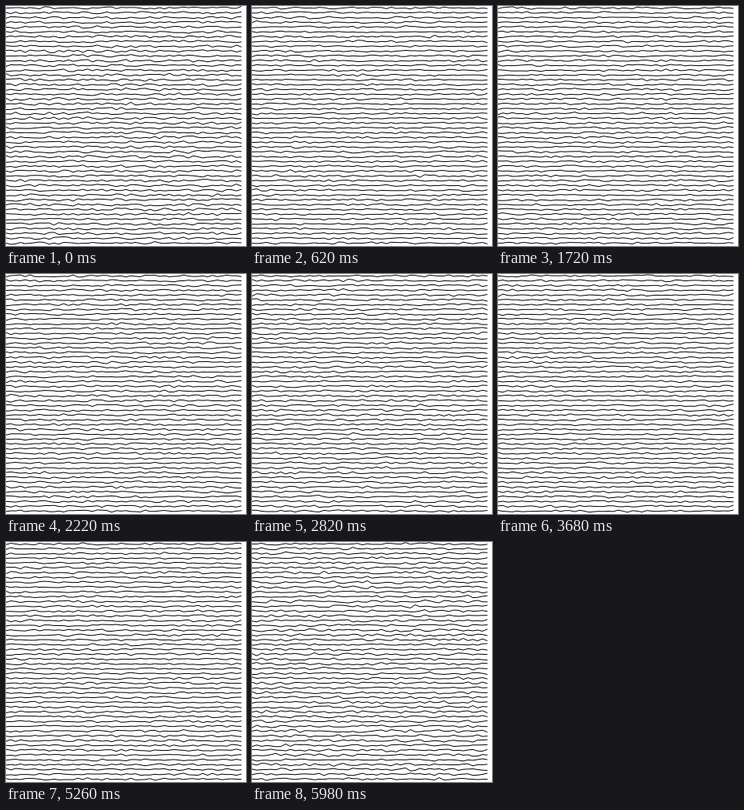
Recreate the animation shown at these times as an HTML page with a canvas. Size 300 by 300 pixels, loop 6 s.

```html
<!DOCTYPE html>
<html lang="en">
<head>
<meta charset="utf-8">
<title>Wavering lines</title>
<style>
  html, body { margin: 0; width: 100%; height: 100%; overflow: hidden; background: #fff; }
  canvas { display: block; width: 300px; height: 300px; }
</style>
</head>
<body>
<canvas id="stage" width="300" height="300"></canvas>
<script>
  const ctx = document.getElementById("stage").getContext("2d");
  const SIZE = 300, GAP = 6, SWING = 5;
  const LOOP = 6000, FRAME = 20;

  // Repeatable random value in 0..1 for a lattice point
  function hash(x, y, z) {
    let h = Math.imul(x + 11, 374761393) ^ Math.imul(y + 37, 668265263) ^ Math.imul(z + 71, 1274126177);
    h = Math.imul(h ^ (h >>> 15), 2246822519);
    h = Math.imul(h ^ (h >>> 13), 3266489917);
    return ((h ^ (h >>> 16)) >>> 0) / 4294967296;
  }

  // Layered noise, eased along time; the lattice is one second apart
  function noise(x, y, t) {
    let sum = 0, weight = 0.5;
    for (let octave = 0; octave < 4; octave++) {
      const cell = Math.floor(t);
      const ease = (1 - Math.cos((t - cell) * Math.PI)) / 2;
      const z = cell + octave * 1000;
      const a = hash(x, y, z), b = hash(x, y, z + 1);
      sum += weight * (a + (b - a) * ease);
      weight /= 2;
      t *= 2;
    }
    return sum;
  }

  function draw(frame) {
    const seconds = frame * FRAME / 1000;
    ctx.fillStyle = "#fff";
    ctx.fillRect(0, 0, SIZE, SIZE);
    ctx.strokeStyle = "#000";
    ctx.lineWidth = 1;
    ctx.lineJoin = "round";
    ctx.lineCap = "round";
    ctx.beginPath();
    for (let y = 0; y < SIZE; y += GAP) {
      for (let x = 0; x < SIZE; x += GAP) {
        const py = y + SWING * noise(x, y, seconds);
        if (x) ctx.lineTo(x, py);
        else ctx.moveTo(x, py);
      }
    }
    ctx.stroke();
  }

  let last = 0;
  const start = performance.now();

  function tick() {
    const time = Math.max(0, performance.now() - start) % LOOP;
    const frame = Math.floor(time / FRAME);
    if (frame !== last) draw(last = frame);
    requestAnimationFrame(tick);
  }

  draw(0);
  requestAnimationFrame(tick);
</script>
</body>
</html>
```
